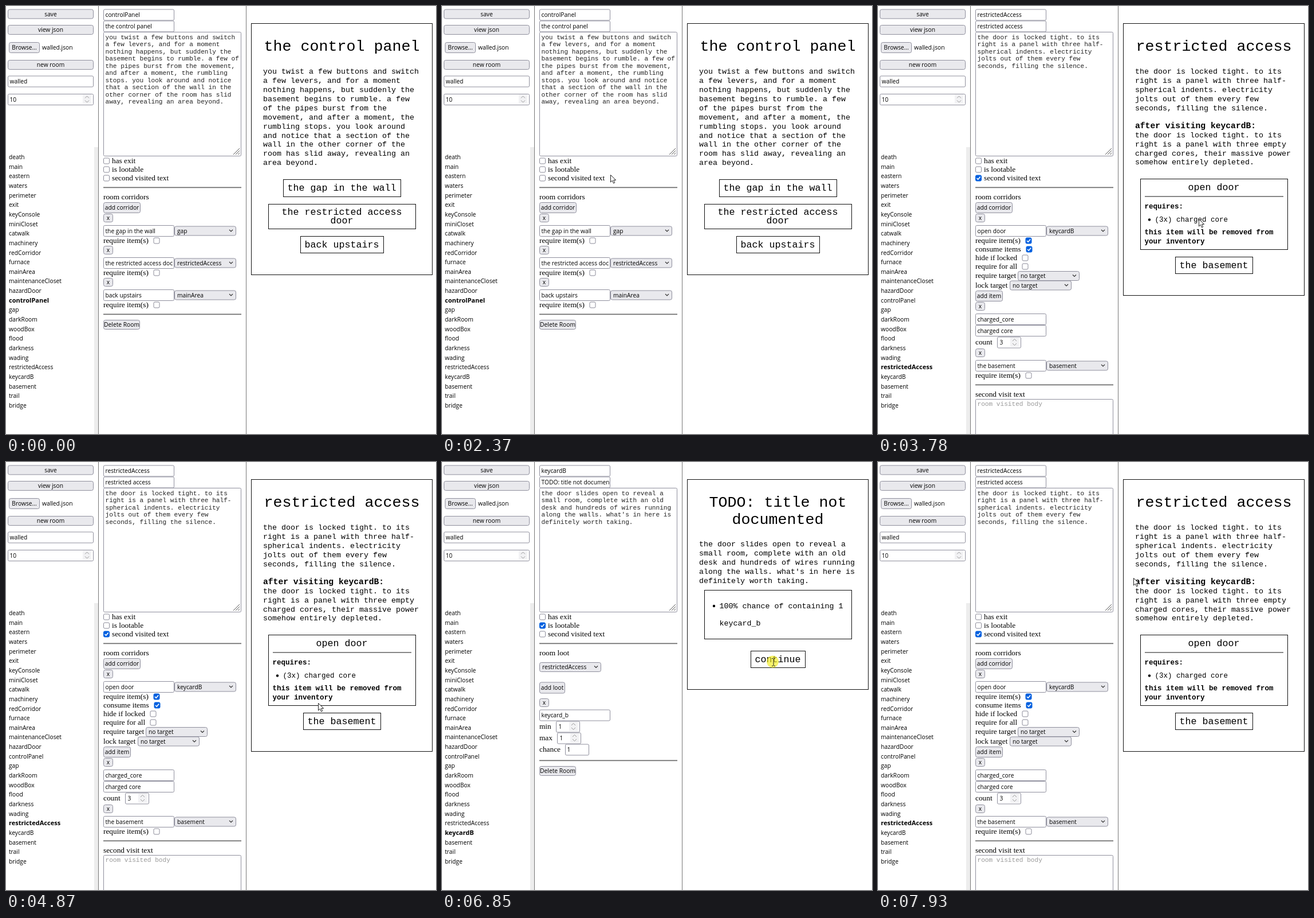
An HTML page for the animation above (8000 ms loop, 751 by 746 pixels).

```html
<!DOCTYPE html>
<html>
<head>
<meta charset="utf-8">
<title>Room editor</title>
<style>
  html, body { margin: 0; width: 100%; height: 100%; overflow: hidden; background: #fff; }
  svg { display: block; }
  text { white-space: pre; }
  .ui { font: 10.25px "Open Sans", "Noto Sans", sans-serif; }
  .on { font: bold 11px "Open Sans", "Noto Sans", sans-serif; }
  .serif { font: 13.33px "Liberation Serif", "Times New Roman", serif; }
  .code, .hint, .body, .title, .link, .note, .strong, .after { font: 13.33px "Liberation Mono", "Courier New", monospace; }
  .code, .hint { font-size: 11.11px; fill: #222; }
  .hint { fill: #999; }
  .title { font-size: 26.67px; }
  .link { font-size: 16.67px; }
  .note, .strong { font-size: 12.5px; }
  .strong, .after { font-weight: bold; }
  .after { font-size: 14.67px; }
</style>
</head>
<body>
<svg id="stage" width="751" height="746" viewBox="0 0 751 746"></svg>
<script>
const EDGE = '#8f8f9d', GREY = '#e9e9ed', MID = 586.5;

// Drawing helpers; for form controls y is the vertical centre of the row.
const text = (x, y, s, cls, anchor = 'start') =>
  `<text x="${x}" y="${y}" class="${cls}" text-anchor="${anchor}">${s}</text>`;
const lines = (x, y, step, list, cls, anchor) =>
  list.map((s, i) => text(x, y + i * step, s, cls, anchor)).join('');
const rect = (x, y, w, h, fill = '#fff', stroke = EDGE, r = 2) =>
  `<rect x="${x + .5}" y="${y + .5}" width="${w}" height="${h}" rx="${r}" fill="${fill}" stroke="${stroke}"/>`;
const path = (d, stroke, width = 1) =>
  `<path d="${d}" fill="none" stroke="${stroke}" stroke-width="${width}"/>`;
const dot = (x, y) => `<circle cx="${x}" cy="${y}" r="2.2"/>`;

const label = (y, s, x = 170) => text(x, y + 4, s, 'serif');
const button = (x, y, w, h, s) =>
  rect(x, y - h / 2, w, h, GREY, EDGE, 3) + text(x + w / 2 + .5, y + 4, s, 'ui', 'middle');
const remove = y => button(170, y, 16, 14, 'x');
const input = (y, s, x = 170, w = 123, h = 19) =>
  rect(x, y - h / 2, w, h) + text(x + 3.5, y + 4, s, 'ui');
const spin = (x, y) =>
  `<rect x="${x - 7}" y="${y - 8}" width="15" height="16" fill="#f2f2f4"/>` +
  path(`M${x - 3} ${y - 2}l3.5 -3.5l3.5 3.5M${x - 3} ${y + 2}l3.5 3.5l3.5 -3.5`, '#999');
const number = (x, y, s) => rect(x, y - 9.5, 41, 19) + text(x + 4.5, y + 4, s, 'ui') + spin(x + 30, y);
const select = (x, y, s) =>
  rect(x, y - 8, 107, 16, GREY, EDGE, 3) + text(x + 5, y + 4, s, 'ui') +
  path(`M${x + 96} ${y - 1.5}l3 3l3 -3`, '#333', 1.2);
const check = (x, y, on) => on
  ? rect(x, y - 5.5, 10, 10, '#0060df', '#0060df') + path(`M${x + 2.5} ${y}l2.2 2.3l4 -4.8`, '#fff', 1.6)
  : rect(x, y - 5.5, 10, 10, '#fff', '#8a8a98');
const rule = y => `<rect x="170" y="${y - 1}" width="241" height="1.7" fill="#6c6c6c"/>`;
const frame = (x, y, x2, y2) => rect(x, y, x2 - x, y2 - y, 'none', '#111', 0);
const link = (x, y, x2, y2, s) => frame(x, y, x2, y2) + text(MID, y + 20, s, 'link', 'middle');

const corridor = (y, name, target, needs) =>
  remove(y) + input(y + 22.5, name) + select(294, y + 22.5, target) +
  label(y + 40, 'require item(s)') + check(257.5, y + 40, needs);

const rooms = ('death main eastern waters perimeter exit keyConsole miniCloset catwalk machinery ' +
  'redCorridor furnace mainArea maintenanceCloset hazardDoor controlPanel gap darkRoom woodBox flood ' +
  'darkness wading restrictedAccess keycardB basement trail bridge').split(' ');

const sidebar = () =>
  button(3, 13.5, 149, 16, 'save') + button(3, 41, 149, 16, 'view json') +
  button(5, 72, 53, 18, 'Browse...') + text(63, 76, 'walled.json', 'ui') +
  button(3, 102, 149, 16, 'new room') + input(131, 'walled', 3, 149) +
  input(162.5, '10', 3, 149) + spin(141, 162.5) +
  '<rect x="154" y="246" width="7" height="500" fill="#ededed"/>' +
  path('M161.5 0V746M419.5 0V746', '#777');

// Parts shared by every room: list, name, title, body text, flags and preview.
function room(id, title, shown, heading, body, preview, bottom, flags, rest) {
  const top = 118 + (heading.length - 1) * 29;
  return rooms.map((r, i) => text(5, 267 + i * 16.65, r, r === id ? 'on' : 'ui')).join('') +
    input(15, id) + input(35, shown) + rect(170, 45, 240, 216) +
    lines(173.5, 57.5, 12.5, body, 'code') +
    path('M397 259l11 -11M401 259l7 -7M405 259l3 -3', '#555') +
    ['has exit', 'is lootable', 'second visited text'].map((s, i) =>
      check(170, 270 + i * 15, flags === i) + label(270 + i * 15, s, 185)).join('') +
    rule(316.5) + frame(428, 30, 744, bottom) +
    lines(MID, 78, 29.5, heading, 'title', 'middle') +
    lines(449, top, 15.93, preview, 'body') + rest;
}

const panelRoom = room('controlPanel', '', 'the control panel', ['the control panel'],
  ['you twist a few buttons and switch', 'a few levers, and for a moment', 'nothing happens, but suddenly the',
   'basement begins to rumble. a few of', 'the pipes burst from the movement,', 'and after a moment, the rumbling',
   'stops. you look around and notice', 'that a section of the wall in the', 'other corner of the room has slid',
   'away, revealing an area beyond.'],
  ['you twist a few buttons and switch', 'a few levers, and for a moment', 'nothing happens, but suddenly the',
   'basement begins to rumble. a few', 'of the pipes burst from the', 'movement, and after a moment, the',
   'rumbling stops. you look around', 'and notice that a section of the', 'wall in the other corner of the',
   'room has slid away, revealing an', 'area beyond.'],
  468, -1,
  label(333, 'room corridors') + button(170, 351, 64, 18, 'add corridor') +
  corridor(369, 'the gap in the wall', 'gap') +
  corridor(425, 'the restricted access doc', 'restrictedAccess') +
  corridor(481, 'back upstairs', 'mainArea') +
  rule(537.5) + button(170, 555, 63, 16, 'Delete Room') +
  link(484, 302, 689, 332, 'the gap in the wall') +
  frame(458, 345, 715, 388) +
  lines(MID, 364, 15, ['the restricted access', 'door'], 'link', 'middle') +
  link(514, 401, 659, 430, 'back upstairs'));

const locked = ['the door is locked tight. to its', 'right is a panel with three half-',
  'spherical indents. electricity', 'jolts out of them every few', 'seconds, filling the silence.'];

const lockedRoom = room('restrictedAccess', '', 'restricted access', ['restricted access'],
  locked, locked, 504, 2,
  label(333, 'room corridors') + button(170, 351, 64, 18, 'add corridor') +
  corridor(369, 'open door', 'keycardB', true) +
  label(424, 'consume items') + check(258.5, 424, true) +
  label(439, 'hide if locked') + check(251.5, 439) +
  label(454, 'require for all') + check(251.5, 454) +
  label(470, 'require target') + select(244, 470, 'no target') +
  label(486.5, 'lock target') + select(230, 486.5, 'no target') +
  button(170, 505, 47, 18, 'add item') + remove(523) +
  input(545.5, 'charged_core') + input(565.5, 'charged core') +
  label(586, 'count') + number(208, 586, '3') +
  corridor(604, 'the basement', 'basement') + rule(660.5) +
  label(677, 'second visit text') + rect(170, 685, 240, 80) + text(173.5, 697, 'room visited body', 'hint') +
  text(449, 213, 'after visiting keycardB:', 'after') +
  lines(449, 229, 15.8, ['the door is locked tight. to its', 'right is a panel with three empty',
    'charged cores, their massive power', 'somehow entirely depleted.'], 'body') +
  link(458, 301, 715, 424, 'open door') + path('M466 332H708', '#111') +
  text(465.5, 353, 'requires:', 'strong') + dot(474, 372.5) + text(483.5, 376, '(3x) charged core', 'note') +
  lines(465.5, 398, 15.5, ['this item will be removed from', 'your inventory'], 'strong') +
  link(519, 437, 654, 466, 'the basement'));

const opened = ['the door slides open to reveal a', 'small room, complete with an old',
  'desk and hundreds of wires running', "along the walls. what's in here is", 'definitely worth taking.'];

const lootRoom = room('keycardB', '', 'TODO: title not documen', ['TODO: title not', 'documented'],
  opened, opened, 396, 1,
  label(333, 'room loot') + select(170, 357, 'restrictedAccess') +
  button(170, 393, 44, 19, 'add loot') + remove(419) + input(441, 'keycard_b') +
  label(461, 'min') + number(199, 461, '1') +
  label(481, 'max') + number(201, 481, '1') +
  label(501, 'chance') + input(501, '1', 215, 41) +
  rule(520.5) + button(170, 538, 63, 16, 'Delete Room') +
  frame(458, 223, 715, 308) + dot(475, 251) +
  lines(484.5, 255, 29.5, ['100% chance of containing 1', 'keycard_b'], 'body') +
  link(539, 329, 634, 358, 'continue'));

const stage = document.getElementById('stage');
stage.innerHTML = sidebar() +
  [panelRoom, lockedRoom, lootRoom].map(s => `<g class="room">${s}</g>`).join('') +
  `<g id="pointer">
    <circle id="click" cx="-.5" r="10.5" fill="#f2ec1c" opacity=".65"/>
    <path id="arrow" d="M.5 .5v12.5l3 -2.8l2 4.8l2.2 -1l-2 -4.6h4z" fill="#fff" stroke="#222"/>
    <path id="beam" d="M-2 -5.5h2l1 1l1 -1h2M1 -4.5v11M-2 7.5h2l1 -1l1 1h2" fill="none" stroke="#222"/>
  </g>`;

const [pointer, click, arrow, beam] = ['pointer', 'click', 'arrow', 'beam'].map(id => document.getElementById(id));
const scenes = [...document.querySelectorAll('.room')];
const show = (el, on) => el.setAttribute('visibility', on ? 'visible' : 'hidden');
const within = (t, a, b) => t >= a && t < b;

// Pointer stops: time, x, y
const stops = [
  [110, 694, 715], [320, 499, 544], [650, 499, 544], [1420, 43, 406], [1630, 53, 392],
  [2020, 53, 392], [2370, 294, 294], [2860, 600, 340], [3200, 592, 388], [3630, 560, 371],
  [4310, 560, 371], [4870, 545, 420], [5150, 578, 388], [5970, 580, 380], [6380, 578, 348],
  [7370, 578, 348], [7930, 446, 202]
];

function place(t) {
  const i = stops.findIndex(s => s[0] > t);
  if (i < 0) return stops[stops.length - 1].slice(1);
  const [t0, x0, y0] = stops[Math.max(i - 1, 0)], [t1, x1, y1] = stops[i];
  const p = Math.max(0, Math.min(1, (t - t0) / (t1 - t0))), e = p * p * (3 - 2 * p);
  return [x0 + (x1 - x0) * e, y0 + (y1 - y0) * e];
}

function draw(now) {
  const t = now % 8000;
  const scene = t < 3780 ? 0 : within(t, 5220, 6980) ? 2 : 1;
  scenes.forEach((g, i) => show(g, i === scene));
  const visible = t >= 110, text = within(t, 6250, 6980);
  pointer.setAttribute('transform', `translate(${place(t).map(Math.round)})`);
  show(arrow, visible && !text);
  show(beam, text);
  show(click, within(t, 3630, 3780) || within(t, 5150, 5220) || within(t, 6780, 6980));
  requestAnimationFrame(() => draw(performance.now()));
}
draw(0);
</script>
</body>
</html>
```
